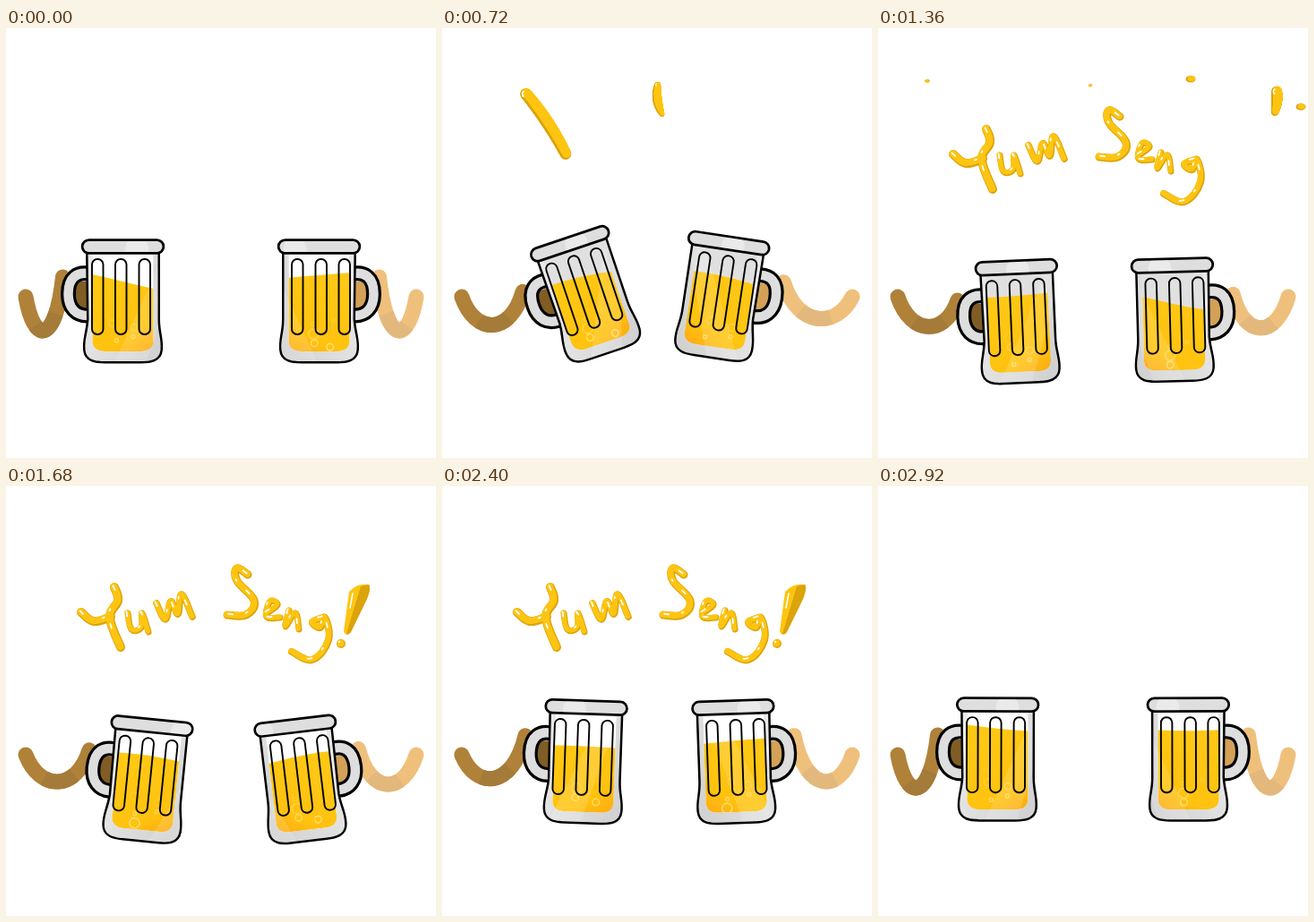
Recreate the animation shown at these times as an HTML page with a canvas. Size 480 by 480 pixels, loop 2960 ms.

```html
<!DOCTYPE html>
<html lang="en">
<head>
<meta charset="utf-8">
<title>Yum Seng</title>
<style>
html, body { margin: 0; width: 100%; height: 100%; overflow: hidden; background: #fff; }
canvas { display: block; width: 480px; height: 480px; }
</style>
</head>
<body>
<canvas id="stage" width="480" height="480" aria-label="Two beer mugs clink, Yum Seng!"></canvas>
<script>
const LOOP = 2960, STEP = 40;
const g = document.getElementById('stage').getContext('2d');
g.lineCap = g.lineJoin = 'round';
const GOLD = '#fdc511', SHADE = '#dba30c';

// time, x, y, angle, beer level, beer tilt
const LEFT = [
  [0, 130.5, 305, 0, -22, 18],
  [100, 124, 324, 2, -28, 4],
  [240, 190, 272, -3, -26, -12],
  [400, 178, 278, -10.5, -22, -9],
  [640, 164, 295, -18, -20, 8],
  [1040, 160, 310, -16.5, -20, -2],
  [1360, 157, 328, -2.5, -30, -3],
  [1700, 157, 328, 6, -25, 4],
  [2040, 158.5, 316.5, 7, -22, 0],
  [2400, 159, 308, 2, -17, 1],
  [2960, 131.5, 305, 0, -37, 8]
];
const RIGHT = [
  [0, 130.5, 305, 0, -29, 6],
  [100, 124, 324, 1, -27, -4],
  [240, 193, 280, 1, -27, 8],
  [400, 190, 288, -1, -26, 0],
  [640, 172, 298, -8, -22, -8],
  [1040, 160.5, 310, -7, -20, 8],
  [1360, 150, 326, 1.5, -19, -18],
  [1700, 150, 328, 7, -25, 8],
  [2040, 151.5, 317, 7.5, -28, 30],
  [2400, 153, 308, 2, -23, 4],
  [2960, 132, 305, 0, -34, 0]
];

// time, start point, end point, bend, radius at start, middle and end
const SPLASH_LEFT = [
  [240, 210, 214, 216, 228, 0, 3, 5, 5],
  [400, 171, 107, 201, 207, 24, 7, 7, 4],
  [600, 112, 72, 172, 132, 20, 7, 8, 3],
  [1040, 64, 100, 53, 192, -38, 5, 4, 16],
  [1160, 88, 138, 116, 152, -10, 6, 8, 9],
  [1280, 90, 145, 120, 145, 0, 1, 3, 1]
];
const SPLASH_RIGHT = [
  [240, 234, 220, 240, 230, 0, 3, 6, 5],
  [400, 230, 109, 236, 190, -4, 4, 9, 4],
  [600, 238, 62, 244, 114, -8, 5, 8, 4],
  [900, 244, 78, 247, 82, 0, 0, 0, 0]
];
const SPLASH_MARK = [
  [1200, 432, 122, 432, 125, 0, 1, 1, 1],
  [1360, 445, 71, 443, 94, 2, 6, 6, 4],
  [1520, 395, 116, 381, 162, 0, 10, 8, 3]
];

const LETTERS = [
  glyph(1150, 10, [84, 141, 98, 151, 117, 146], [121, 113, 125, 128, 116, 147, 128, 180]),
  glyph(1190, 7, [136, 142, 140, 160, 151, 158, 152, 142, 159, 163]),
  glyph(1210, 7.5, [168, 131, 178, 149, 184, 129, 192, 143, 196, 121, 208, 146]),
  glyph(1150, 9, [270, 99, 258, 92, 258, 106, 277, 128, 268, 144, 247, 144]),
  glyph(1180, 7, [291, 142, 303, 133, 295, 129, 291, 146, 306, 147]),
  glyph(1200, 7, [316, 139, 312, 157, 323, 142, 327, 160]),
  glyph(1210, 8, [354, 147, 342, 152, 351, 158, 356, 147, 360, 172, 342, 194, 319, 185])
];

const MARK = new Path2D('M383 118Q392 108 405 110Q408 113 403 126L385 163Q379 169 377 162Z');
const MARK_SIDE = new Path2D('M396 112L405 110Q408 113 403 126L385 163Q382 167 380 165Z');
const LINE = new Path2D('M198 174Q240 157 281 170Q236 165 198 174Z');
const BODY = new Path2D('M-39-57L-38 20C-39 35-43 42-42 54C-41 66-30 67-20 67L20 67C30 67 41 66 42 54C43 42 39 35 39 20L39-57Z');
const INNER = new Path2D('M-34-56L-34 40Q-36 56-20 56L20 56Q36 56 34 40L34-56Z');
const HANDLE = new Path2D('M-40-31C-50-32-61-28-61-8C-61 8-52 16-40 16');
const GLOSS = new Path2D('M44-60L62-60L20 70L-16 70Z');
const RIM = pill(-44, -67, 88, 12, 6);
const SLOTS = [-34.5, -8.5, 18].map(x => pill(x, -47, 12.5, 84, 6));
const FINGERS = pill(-53, -22, 18, 31, 6);

function pill(x, y, w, h, r) {
  const p = new Path2D();
  p.roundRect(x, y, w, h, r);
  return p;
}

// Rounded stroke through the given points
function glyph(start, width, ...strokes) {
  const path = new Path2D();
  for (const s of strokes) {
    const last = s.length / 2 - 1;
    const pt = i => { const k = Math.max(0, Math.min(last, i)) * 2; return [s[k], s[k + 1]]; };
    path.moveTo(...pt(0));
    for (let i = 0; i < last; i++) {
      const [a, b, c, d] = [pt(i - 1), pt(i), pt(i + 1), pt(i + 2)];
      path.bezierCurveTo(b[0] + (c[0] - a[0]) / 5, b[1] + (c[1] - a[1]) / 5,
        c[0] - (d[0] - b[0]) / 5, c[1] - (d[1] - b[1]) / 5, c[0], c[1]);
    }
  }
  return { start, width, path };
}

const clamp = v => Math.max(0, Math.min(1, v));
const ramp = (t, start, span) => clamp((t - start) / span);
const bump = (t, mid, span) => Math.max(0, 1 - ((t - mid) / span) ** 2);

// Smooth curve through timed rows
function sample(rows, t) {
  let i = 0;
  while (i < rows.length - 2 && t >= rows[i + 1][0]) i++;
  const a = rows[i], b = rows[i + 1], before = rows[i - 1] || a, after = rows[i + 2] || b;
  const span = b[0] - a[0], u = clamp((t - a[0]) / span), u2 = u * u, u3 = u2 * u;
  return a.slice(1).map((start, j) => {
    const k = j + 1;
    const m0 = (b[k] - before[k]) / (b[0] - before[0]) * span;
    const m1 = (after[k] - start) / (after[0] - a[0]) * span;
    return (2 * u3 - 3 * u2 + 1) * start + (u3 - 2 * u2 + u) * m0 + (3 * u2 - 2 * u3) * b[k] + (u3 - u2) * m1;
  });
}

function fill(path, color) { g.fillStyle = color; g.fill(path); }
function line(path, color, width) { g.strokeStyle = color; g.lineWidth = width; g.stroke(path); }
function disc(x, y, r, color) {
  if (r <= 0) return;
  g.beginPath();
  g.arc(x, y, r, 0, 7);
  g.fillStyle = color;
  g.fill();
}

function arm([x, y, deg], skin) {
  const a = deg * Math.PI / 180, c = Math.cos(a), s = Math.sin(a);
  const sx = 22, sy = 300;
  const ex = x - 67 * c + 27 * s, ey = y - 67 * s - 27 * c, dx = ex - sx;
  const reach = Math.hypot(dx, ey - sy);
  const sag = sy + 0.65 * Math.sqrt(Math.max(0, 95 * 95 - reach * reach));
  const p = new Path2D();
  p.moveTo(sx, sy);
  p.bezierCurveTo(sx + dx * 0.22, sag, ex - dx * 0.2, sag, ex, ey);
  line(p, skin.arm, 17);
  g.lineCap = 'butt';
  g.setLineDash([0, 34, 36, 300]);
  line(p, skin.patch, 17);
  g.setLineDash([]);
  g.lineCap = 'round';
}

function beerShape(level, tilt, bend) {
  const p = new Path2D();
  p.moveTo(-40, level - tilt / 2);
  p.bezierCurveTo(-14, level - tilt / 4 + bend, 14, level + tilt / 4 + bend, 40, level + tilt / 2);
  p.lineTo(40, 70);
  p.lineTo(-40, 70);
  p.closePath();
  return p;
}

function mug([x, y, deg, level, tilt], skin, t) {
  const depth = skin.depth * bump(t, skin.spill, 220);
  const sway = 28 * Math.sin(t / LOOP * Math.PI * 4 + skin.seed);
  g.save();
  g.translate(x, y);
  g.rotate(deg * Math.PI / 180);
  fill(FINGERS, skin.hand);
  line(HANDLE, '#000', 17);
  line(HANDLE, '#dedede', 10.5);
  line(BODY, '#000', 5);
  const glass = g.createLinearGradient(-42, 0, 42, 40);
  glass.addColorStop(0, '#e9e9e9');
  glass.addColorStop(1, '#d2d2d2');
  fill(BODY, glass);

  g.save();
  g.clip(INNER);
  fill(INNER, t > 240 && t < 1480 ? '#e0e0e0' : '#fff');
  if (depth > 1) fill(beerShape(level, tilt, -depth * 0.4), '#bd8e0c');
  const beer = g.createLinearGradient(-20, -20, 30, 60);
  beer.addColorStop(0, '#ffc814');
  beer.addColorStop(0.7, '#ffc20f');
  beer.addColorStop(1, '#ffa914');
  g.clip(beerShape(level, tilt, depth > 1 ? depth : 3 * Math.sin(t / 150)));
  fill(INNER, beer);
  for (let i = 0; i < 5; i++) {
    const u = (t / 1480 + i * 0.37 + skin.seed) % 1;
    g.beginPath();
    g.arc((i * 23 + skin.seed * 40) % 46 - 18 + 3 * Math.sin(u * 9 + i), 52 - u * 40, 2 + i % 3 * 1.8, 0, 7);
    g.strokeStyle = `rgba(255,232,140,${0.75 * (1 - u)})`;
    g.lineWidth = 1.6;
    g.stroke();
  }
  g.restore();

  g.save();
  g.clip(BODY);
  g.translate(sway, 0);
  fill(GLOSS, 'rgba(255,255,255,.14)');
  g.restore();

  SLOTS.forEach(s => line(s, '#000', 1.9));
  line(RIM, '#000', 5.5);
  fill(RIM, '#dedede');
  g.save();
  g.clip(RIM);
  disc(10 + sway, -58, 13, 'rgba(255,255,255,.35)');
  g.restore();
  g.restore();
}

function side(rows, skin, t) {
  const pose = sample(rows, t);
  g.save();
  if (skin.flip) { g.translate(480, 0); g.scale(-1, 1); }
  arm(pose, skin);
  mug(pose, skin, t);
  g.restore();
}

function splash(rows, t) {
  if (t < rows[0][0] || t >= rows[rows.length - 1][0]) return;
  const [x0, y0, x1, y1, bend, r0, rm, r1] = sample(rows, t);
  const dx = x1 - x0, dy = y1 - y0, len = Math.hypot(dx, dy) || 1;
  const at = u => {
    const v = 1 - u, bow = 2 * u * v * bend / len;
    const r = v * (1 - 2 * u) * r0 + 4 * u * v * rm + u * (2 * u - 1) * r1;
    return [x0 + dx * u + dy * bow, y0 + dy * u - dx * bow, Math.max(0, r)];
  };
  const each = fn => { for (let i = 0; i <= 48; i++) fn(...at(i / 48)); };
  each((x, y, r) => disc(x, y, r, SHADE));
  each((x, y, r) => disc(x + r * 0.16, y - r * 0.16, r * 0.82, GOLD));
  const heavyEnd = r1 > r0;
  const [hx, hy, r] = at(heavyEnd ? 1 : 0);
  if (r < 2) return;
  g.beginPath();
  if (heavyEnd) {
    g.arc(hx, hy, r * 0.75, 1.9, 2.9);
    g.moveTo(hx + r * 0.75, hy);
    g.arc(hx, hy, r * 0.75, 0, 0.8);
  } else {
    g.arc(hx, hy, r * 0.6, 2.4, 4);
  }
  g.strokeStyle = '#fff';
  g.lineWidth = Math.min(3.5, r * 0.3);
  g.stroke();
}

// Each drop: x and y at the top of its arc, travel, radius
function drops(t, start, span, ...list) {
  const u = (t - start) / span;
  if (u <= 0 || u >= 1) return;
  const k = 2 * u - 1, fade = Math.min(1, 6 * u, 6 * (1 - u));
  for (const [x, y, travel, size] of list) {
    const r = size * fade;
    g.save();
    g.translate(x + travel * k / 2, y + 45 * k * k);
    g.rotate(Math.atan2(180 * k, travel));
    g.scale(1.1, 0.75);
    disc(0, 0, r, SHADE);
    disc(r * 0.15, -r * 0.15, r * 0.8, GOLD);
    g.restore();
  }
}

function letter({ start, width, path }, i, t) {
  const u = Math.min(ramp(t, start, 140), 1 - ramp(t, 2470 + i * 15, 220));
  if (u <= 0) return;
  const w = width * (0.5 + 0.5 * u);
  g.setLineDash(u < 1 ? [150 * u, 400] : []);
  line(path, SHADE, w);
  g.save();
  g.translate(-0.6, -0.8);
  line(path, GOLD, w * 0.78);
  if (u === 1) {
    g.translate(-0.8, -0.8);
    g.setLineDash([5, 24, 2, 15]);
    line(path, '#fff', 1.8);
  }
  g.restore();
  g.setLineDash([]);
}

function scaled(x, y, sx, sy, draw) {
  if (sx <= 0 || sy <= 0) return;
  g.save();
  g.translate(x, y);
  g.scale(sx, sy);
  g.translate(-x, -y);
  draw();
  g.restore();
}

function mark(t) {
  if (t < 1520) return;
  const u = 1 - ramp(t, 2560, 200);
  scaled(381, 164, u, u, () => {
    fill(MARK, GOLD);
    fill(MARK_SIDE, SHADE);
    line(new Path2D('M387 120L384 136'), '#fff', 1.6);
  });
  const r = 5 * Math.min(u, ramp(t, 1520, 120));
  disc(374, 176, r, SHADE);
  disc(373.5, 175.5, r * 0.82, GOLD);
  disc(372, 174, r * 0.25, '#fff');
}

function underline(t) {
  const show = ramp(t, 1860, 140), stay = 1 - ramp(t, 2120, 160);
  scaled(show < 1 ? 198 : 281, 170, Math.min(show, stay), 1, () => {
    line(LINE, SHADE, 4);
    g.translate(0, -0.6);
    line(LINE, GOLD, 2.6);
    fill(LINE, GOLD);
  });
}

const BROWN = { arm: '#b08139', patch: '#a47b39', hand: '#805d24', seed: 0.2, spill: 400, depth: 15 };
const TAN = { arm: '#efc07c', patch: '#e3b87c', hand: '#d3a158', seed: 0.65, spill: 1040, depth: 8, flip: true };

function draw(t) {
  g.clearRect(0, 0, 480, 480);
  side(LEFT, BROWN, t);
  side(RIGHT, TAN, t);
  splash(SPLASH_LEFT, t);
  splash(SPLASH_RIGHT, t);
  splash(SPLASH_MARK, t);
  LETTERS.forEach((l, i) => letter(l, i, t));
  mark(t);
  underline(t);
  drops(t, 240, 400, [171, 184, -88, 6], [270, 173, 60, 8], [250, 201, 20, 5], [219, 190, -22, 5], [189, 185, -46, 4]);
  drops(t, 800, 480, [259, 57, 38, 4.5]);
  drops(t, 1160, 400, [55, 59, -50, 2.5], [237, 64, -26, 2], [349, 57, 38, 5], [472, 88, 3, 5]);
  drops(t, 1800, 480, [295, 67, 80, 7], [334, 27, 52, 4.5], [429, 92, 50, 6.5]);
  for (let i = 0; i < 5; i++) drops(t, 2450 + i * 15, 280, [104 + i * 70, 63 + i % 3 * 14, i * 8 - 16, 4]);
}

const begin = performance.now();
function tick() {
  const t = (performance.now() - begin) % LOOP;
  draw(Math.floor(t / STEP) * STEP);
  requestAnimationFrame(tick);
}
tick();
</script>
</body>
</html>
```
